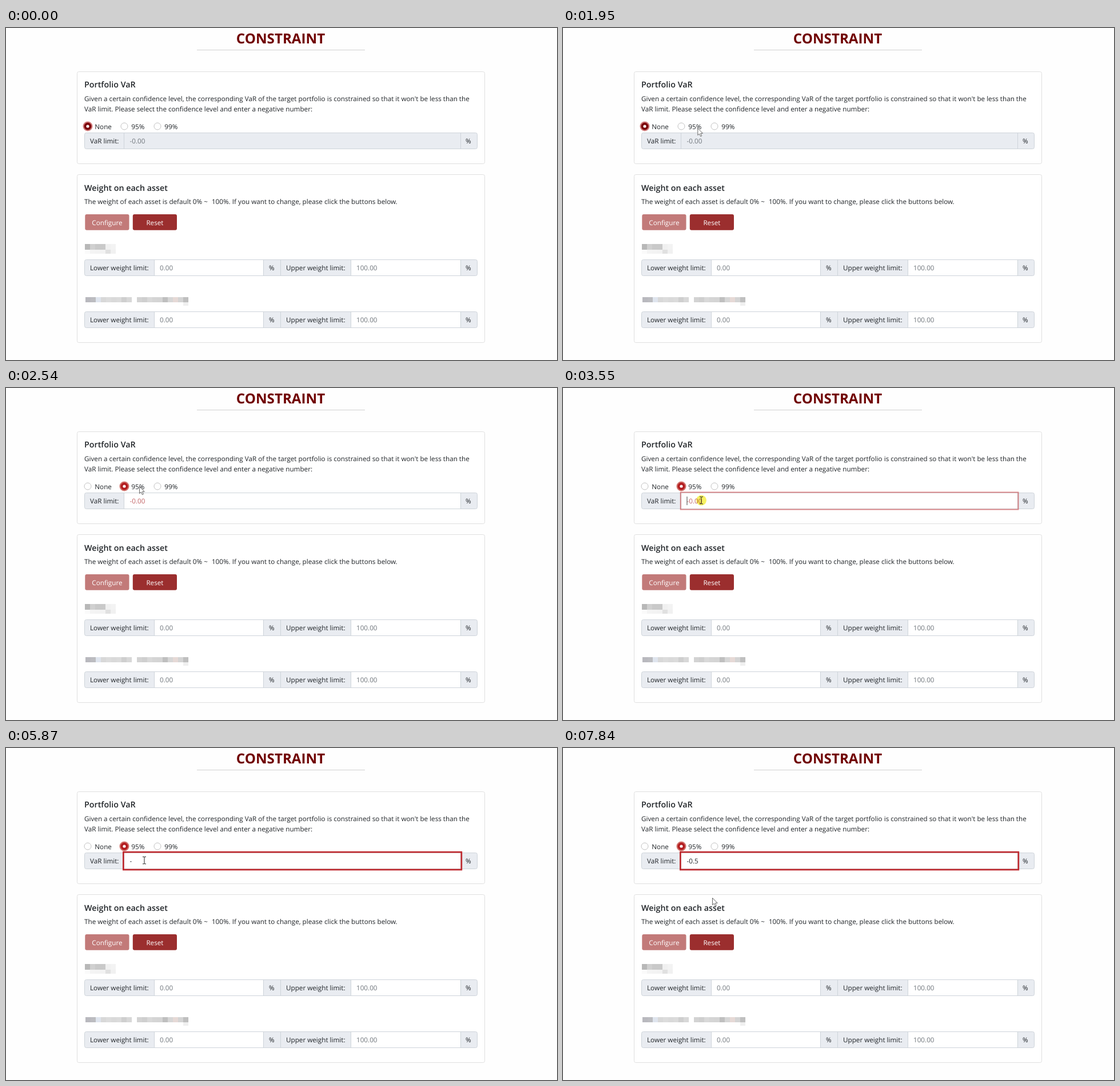
An HTML page for the animation above (7.99 s loop, 964 by 581 pixels).

```html
<!DOCTYPE html>
<html lang="en">
<head>
<meta charset="utf-8">
<title>Constraint form</title>
<style>
html, body { margin: 0; width: 100%; height: 100%; overflow: hidden; background: #fefefe; }
svg { display: block; }
text { font: 11.7px "Open Sans", "Noto Sans", sans-serif; fill: #212529; white-space: pre; text-rendering: geometricPrecision; }
text.title { font-size: 24.2px; font-weight: 700; fill: #700000; }
text.head { font-size: 14.3px; font-weight: 600; }
text.hint { fill: #73797f; }
text.button { fill: #fff; }
.mid { text-anchor: middle; }
.card { fill: #fff; stroke: #dfdfdf; }
.addon { fill: #e9ecf1; stroke: #ced4da; }
.input { fill: #fff; stroke: #ced4da; }
</style>
</head>
<body>
<svg id="stage" width="964" height="581" viewBox="0 0 964 581"></svg>
<script>
const LOOP = 7990;
const stage = document.getElementById('stage');

const text = (x, y, s, cls = '', id = '') => `<text x="${x}" y="${y}" class="${cls}" id="${id}">${s}</text>`;
const box = (x, y, w, h, cls, r = 0, id = '') =>
  `<rect x="${x + .5}" y="${y + .5}" width="${w}" height="${h}" rx="${r}" class="${cls}" id="${id}"/>`;
const button = (x, fill, label) =>
  `<rect x="${x}" y="326" width="77.2" height="27.7" rx="3" fill="${fill}"/>` + text(x + 38.6, 345, label, 'button mid');
const radio = (x, label, id) => `<g id="${id}" transform="translate(${x} 172)">
  <circle class="ring" r="8.5"/><circle class="disc" r="6"/><circle class="dot" r="2.6" fill="#fff"/></g>` +
  text(x + 12.3, 177, label);

const weightRow = y => box(137, y, 687, 28, 'addon', 3) +
  box(259, y, 191, 28, 'input') + box(480, y, 0, 28, 'addon') + box(603, y, 192, 28, 'input') +
  '<path d="M480.5 ' + (y + .5) + 'v28" stroke="#ced4da"/>' +
  text(147, y + 19, 'Lower weight limit:') + text(269, y + 19, '0.00', 'hint') + text(460, y + 19, '%') +
  text(490, y + 19, 'Upper weight limit:') + text(613, y + 19, '100.00', 'hint') + text(804, y + 19, '%');

// Blurred asset names: a row of cells, one grey tone each
const mosaic = (x, y, h, tones) => tones.split(' ').map((tone, i) =>
  `<rect x="${x + i * 9}" y="${y}" width="9.1" height="${h}" fill="#${tone.length > 2 ? tone : tone.repeat(3)}"/>`).join('');

stage.innerHTML =
  text(480.5, 26.7, 'CONSTRAINT', 'title mid') +
  '<path d="M334 38.5H628" stroke="#cfcfcf"/>' +
  box(124, 76, 713, 161, 'card', 3) +
  text(137, 104, 'Portfolio VaR', 'head') +
  text(137, 128, "Given a certain confidence level, the corresponding VaR of the target portfolio is constrained so that it won't be less than the") +
  text(137, 146, 'VaR limit. Please select the confidence level and enter a negative number:') +
  radio(143, 'None', 'none') + radio(207, '95%', 'r95') + radio(265, '99%', 'r99') +
  box(137, 183, 687, 28, 'addon', 3) + box(206, 183, 589, 28, 'input', 0, 'field') +
  '<rect id="focus" fill="none" stroke="#bf2a2f"/>' +
  text(147, 202, 'VaR limit:') + text(804, 202, '%') + text(216.5, 202, '', '', 'value') +
  box(124, 256, 713, 294, 'card', 3) +
  text(137, 285, 'Weight on each asset', 'head') +
  text(137, 308, 'The weight of each asset is default 0% ~<tspan dx="4"> 100%. If you want to change, please click the buttons below.</tspan>') +
  button(138.3, '#c27a79', 'Configure') + button(221.8, '#9b2e2e', 'Reset') +
  mosaic(138, 378, 10, 'b8 d0 c9 c9 f0 f3') + mosaic(138, 388, 7, 'fa f4 f3 f2 e0 f1') +
  mosaic(139, 471, 9, 'b9b9be bcbcc0 dfe5ee d8 dc d9 db cf d8') +
  mosaic(229, 471, 9, 'd3 cf d9 d5 d4 bf d6 e6d9d6 d4 bf') + mosaic(310, 480, 6, 'f0') +
  weightRow(405) + weightRow(496) +
  '<circle id="glow" r="9" fill="#f5ee3c" opacity=".8" style="mix-blend-mode:multiply"/>' +
  '<rect id="caret" y="190" width="1" height="15" fill="#444"/>' +
  '<path id="arrow" d="M.5 .5V12.6L3.3 10.1L5.4 14.7L7.4 13.8L5.4 9.3H9.2Z" fill="#fff" stroke="#555" stroke-width=".9"/>' +
  '<path id="beam" d="M-3-6.2H-.8L0-5.6L.8-6.2H3M0-5.6V5.6M-3 6.2H-.8L0 5.6L.8 6.2H3" fill="none" stroke="#222"/>';

const el = id => document.getElementById(id);
const set = (node, attrs) => { for (const k in attrs) node.setAttribute(k, attrs[k]); };
const show = (id, on) => set(el(id), { visibility: on ? 'visible' : 'hidden' });
const inside = (t, a, b) => t >= a && t < b;
// Last value whose start time has passed
const at = (table, t, v) => { for (const [start, next] of table) if (t >= start) v = next; return v; };

// Pointer moves: first step, last step, number of steps, target
const moves = [
  [670, 820, 3, 518, 382],
  [1180, 1380, 4, 275, 226],
  [1690, 2000, 7, 233, 172],
  [2750, 3100, 6, 242, 196.6],
  [7531, 7840, 7, 261, 262]
];
const typed = [[5340, '-'], [6300, '-0'], [6650, '-0.'], [6970, '-0.5']];
const focusSteps = [[3480, .25], [3550, .55], [3620, .85], [3680, 1]];
const caretSpans = [[3480, 4020], [4520, 5070], [5340, 5870], [6300, 7480]];

function pointer(t) {
  let x = 859, y = 632;
  for (const [start, end, n, tx, ty] of moves) {
    if (t < start) break;
    const step = Math.floor((t - start) / (end - start) * (n - 1) + 1e-6) + 1;
    const p = Math.min(1, step / n), e = p * p * (3 - 2 * p);
    x += (tx - x) * e;
    y += (ty - y) * e;
  }
  return [x, y];
}

function setRadio(id, ring, disc, edge, dot) {
  const [r, d, c] = el(id).children;
  set(r, { fill: ring });
  set(d, { fill: disc, stroke: edge, 'stroke-width': .9 });
  set(c, { opacity: dot ? 1 : 0 });
}

function draw(t) {
  const chosen = t >= 2540, pressed = inside(t, 2410, 2540);
  if (chosen) {
    setRadio('none', 'none', '#fff', '#bbb', false);
    setRadio('r95', '#d0706a', '#b31b1e', '#b31b1e', true);
  } else {
    setRadio('none', '#d07c7c', '#7a0308', '#7a0308', true);
    setRadio('r95', pressed ? '#cf6a66' : 'none', pressed ? '#e6e6e6' : '#fff', pressed ? '#b8524f' : '#bbb', false);
  }
  setRadio('r99', 'none', '#fff', '#bbb', false);
  set(el('field'), { class: chosen ? 'input' : 'addon' });

  const value = at(typed, t, '');
  el('value').textContent = value || '-0.00';
  el('value').style.fill = value ? '#212529' : chosen ? '#c4686a' : '#73797f';

  const focus = at(focusSteps, t, 0), w = 1 + focus * 1.7;
  set(el('focus'), {
    x: 206.7 - w / 2, y: 183.5 - w / 2, width: 588.8 + w, height: 28.1 + w,
    'stroke-width': w, opacity: focus
  });

  show('caret', caretSpans.some(([a, b]) => inside(t, a, b)));
  set(el('caret'), { x: 216.5 + (value ? el('value').getComputedTextLength() : 0) });

  const [x, y] = pointer(t), beam = chosen && inside(y, 183, 212);
  for (const id of ['arrow', 'beam', 'glow']) set(el(id), { transform: `translate(${x} ${y})` });
  show('arrow', !beam);
  show('beam', beam);
  show('glow', inside(t, 2290, 2480) || inside(t, 3420, 3620));
}

const began = performance.now();
function tick() {
  draw((performance.now() - began) % LOOP);
  requestAnimationFrame(tick);
}
tick();
</script>
</body>
</html>
```
